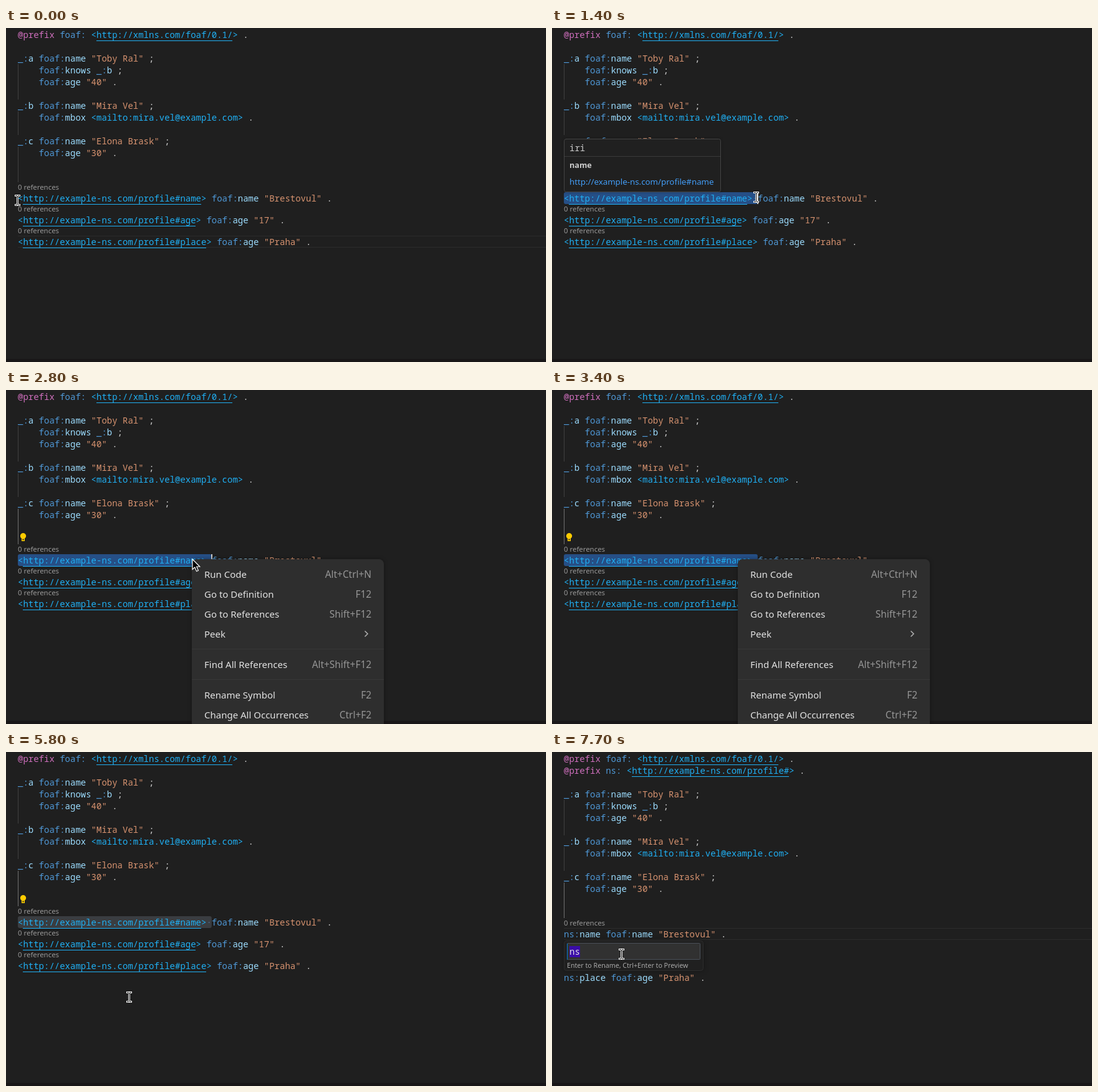
Recreate the animation shown at these times as an HTML page with a canvas. Size 866x537 px, loop 8 s.

```html
<!DOCTYPE html>
<html lang="en">
<head>
<meta charset="utf-8">
<title>Editor: extract prefix</title>
<style>
  html, body { margin: 0; width: 100%; height: 100%; overflow: hidden; background: #1f1f1f; }
  canvas { display: block; }
</style>
</head>
<body>
<canvas id="stage" width="866" height="537"></canvas>
<script>
const ctx = document.getElementById('stage').getContext('2d');
const LOOP = 8000, LEFT = 19, CHAR = 8.4, LINE = 19, LENS = 16;
const MONO = '14px "Noto Sans Mono", monospace';
const sans = (size, weight = 400) => `${weight} ${size}px "Noto Sans", sans-serif`;
const C = {
  bg: '#1f1f1f', keyword: '#cf6fbd', prefix: '#4f98d6', local: '#9cdcfe', iri: '#20b0f4',
  string: '#d6926f', plain: '#d0d0d0', fresh: '#3dd0b0', lens: '#999999',
  select: '#264f86', idle: '#3a3d41', match: '#343a41'
};

const BODY = [
  '', '_:a foaf:name "Toby Ral" ;', '    foaf:knows _:b ;', '    foaf:age "40" .',
  '', '_:b foaf:name "Mira Vel" ;', '    foaf:mbox <mailto:mira.vel@example.com> .',
  '', '_:c foaf:name "Elona Brask" ;', '    foaf:age "30" .', '', ''
];
const HEAD = '@prefix foaf: <http://xmlns.com/foaf/0.1/> .';
const NS = 'http://example-ns.com/profile#';
const ITEMS = [['name', 'foaf:name "Brestovul" .'], ['age', 'foaf:age "17" .'], ['place', 'foaf:age "Praha" .']];

const colX = col => LEFT + col * CHAR;
const at = (t, from, to) => t >= from && t < to;

function rect(x, y, w, h, color) {
  ctx.fillStyle = color;
  ctx.fillRect(x, y, w, h);
}

function text(str, x, y, font, color, align = 'left') {
  ctx.font = font;
  ctx.fillStyle = color;
  ctx.textAlign = align;
  ctx.fillText(str, x, y);
}

function panel(x, y, w, h, r, fill, stroke, blur = 0) {
  ctx.save();
  ctx.shadowColor = 'rgba(0,0,0,.36)';
  ctx.shadowBlur = blur;
  ctx.beginPath();
  ctx.roundRect(x, y, w, h, r);
  ctx.fillStyle = fill;
  ctx.fill();
  ctx.shadowBlur = 0;
  if (stroke) {
    ctx.strokeStyle = stroke;
    ctx.lineWidth = 1;
    ctx.stroke();
  }
  ctx.restore();
}

function underline(from, to, top) {
  rect(Math.round(colX(from)), top + 19, Math.round((to - from) * CHAR), 1, C.iri);
}

// Splits a line into coloured tokens; style overrides the default colours.
function code(line, top, style = {}) {
  const color = { ...C, ...style };
  const put = (str, col, c) => text(str, colX(col), top + 15, MONO, c);
  for (const m of line.matchAll(/@prefix|<[^>]*>|"[^"]*"|(\w+:)(\w*)|[.;]/g)) {
    const [tok, pre, local] = m, col = m.index;
    if (tok[0] === '@') put(tok, col, color.keyword);
    else if (tok[0] === '<') {
      put(tok, col, color.iri);
      if (tok[1] === 'h' && !style.noLink) underline(col + 1, col + tok.length - 1, top);
    } else if (tok[0] === '"') put(tok, col, color.string);
    else if (pre) {
      put(pre, col, color.prefix);
      put(local, col + pre.length, color.local);
    } else put(tok, col, color.plain);
  }
}

function lineBox(top) {
  rect(LEFT, top, 847, 1, '#2c2c2c');
  rect(LEFT, top + 18, 847, 1, '#2c2c2c');
}

const selectedCols = t => {
  if (t < 600) return 0;
  const steps = [8, 16, 25, 31, 34, 36];
  return steps[(t - 600) / 100] ?? 37;
};

function caretOn(t) {
  if (t < 400) return false;
  if (t < 1900) return true;
  if (t < 2400) return false;
  if (t < 3200) return true;
  if (t < 3700) return false;
  if (t < 4200) return true;
  return at(t, 4600, 4700) || at(t, 6700, 7000);
}

function selection(t, top, renamed) {
  if (t >= 7000) return;
  const n = renamed ? 8 : selectedCols(t);
  const bar = (y, color, col = 0) => {
    ctx.beginPath();
    ctx.roundRect(colX(col), y, n * CHAR, LINE, 3);
    ctx.fillStyle = color;
    ctx.fill();
  };
  if (n) bar(top, at(t, 4700, 6700) ? C.idle : C.select);
  if (n && n <= 31 && !renamed) {
    bar(top + 35, C.match);
    bar(top + 70, C.match);
    if (n <= 8) bar(1, C.match, 14);
  }
  if (renamed || n === 37) text('·', colX(n - 1), top + 15, MONO, '#4f6c8c');
}

function bulb() {
  ctx.fillStyle = '#ffcc00';
  ctx.beginPath();
  ctx.arc(27.5, 234.7, 4.7, 0, 7);
  ctx.fill();
  rect(25, 238, 5, 5, '#ffcc00');
  rect(26.5, 239.5, 2, 2, C.bg);
}

function editor(t) {
  const renamed = t >= 6700, shift = renamed ? LINE : 0, linked = t < 7700;
  const nameTop = 264 + shift;
  rect(0, 0, 866, 537, C.bg);
  rect(0, 532, 866, 5, '#191718');

  if (t < 400) lineBox(334);
  else if (t < 600 || t >= 7000) lineBox(nameTop);
  if (at(t, 100, 400)) rect(LEFT, 264, 37 * CHAR, LINE, '#213248');
  selection(t, nameTop, renamed);

  for (const [from, to, active] of [[58, 115], [134, 172], [191, 248, t >= 400]])
    rect(LEFT, from + shift, 1, to - from, active ? '#707070' : '#404040');

  code(HEAD, 1);
  if (renamed) {
    const raw = t < 6800 ? { keyword: C.plain, iri: C.fresh } : {};
    code(`@prefix ns: <${NS}> .`, 20, { ...raw, noLink: linked });
  }
  BODY.forEach((line, i) => code(line, 20 + shift + i * LINE));

  ITEMS.forEach(([id, rest], i) => {
    const top = nameTop + i * (LINE + LENS);
    text('0 references', LEFT, top - 4, sans(11.4), C.lens);
    if (!renamed) return code(`<${NS}${id}> ${rest}`, top);
    const subject = `ns:${id}`, pad = ' '.repeat(subject.length + 1);
    code(subject, top, t < 6800 ? { prefix: C.iri, local: C.iri } : {});
    code(pad + rest, top);
    if (linked) underline(0, subject.length, top);
  });

  if (at(t, 2700, 7300)) bulb();
  if (caretOn(t)) {
    const col = renamed ? 8 : selectedCols(t);
    rect(Math.round(colX(col)) - 1, nameTop, 2, LINE, '#c8c8c8');
  }
}

function hoverCard(alpha) {
  ctx.globalAlpha = alpha;
  panel(19.5, 178.5, 251, 85, 3, '#202020', '#454545', 4);
  rect(20, 206, 250, 1, '#3a3a3a');
  text('iri', 28, 198, MONO, '#cccccc');
  text('name', 28, 225, sans(12.6, 700), '#cccccc');
  text(NS + 'name', 28, 252, sans(13.3), '#429cf5');
  ctx.globalAlpha = 1;
}

const MENU = [
  [296, 'Run Code', 'Alt+Ctrl+N'], [328, 'Go to Definition', 'F12'],
  [360, 'Go to References', 'Shift+F12'], [392, 'Peek', ''],
  [441, 'Find All References', 'Alt+Shift+F12'],
  [490, 'Rename Symbol', 'F2'], [522, 'Change All Occurrences', 'Ctrl+F2']
];

function menu(t) {
  ctx.globalAlpha = t < 2800 ? 0.6 : 1;
  panel(298, 272, 308, 300, 8, '#2e2e2e', null, 6);
  for (const y of [416, 465]) rect(298, y, 308, 1, '#383838');
  const active = t === 3200 ? 392 : t === 3300 ? 490 : 0;
  for (const [y, label, keys] of MENU) {
    if (y === active) rect(298, y - 16, 308, 32, '#434343');
    text(label, 318, y + 6, sans(15), '#e2e2e2');
    text(keys, 586, y + 6, sans(15.4), '#969696', 'right');
  }
  ctx.strokeStyle = '#b0b0b0';
  ctx.lineWidth = 1.5;
  ctx.beginPath();
  ctx.moveTo(576, 388);
  ctx.lineTo(580, 392);
  ctx.lineTo(576, 396);
  ctx.stroke();
  ctx.globalAlpha = 1;
}

function renameBox() {
  panel(19.5, 303.5, 223, 48, 4, '#202020', '#2d2d2d', 8);
  panel(24.5, 307.5, 213, 26, 1, '#313131', '#4a5058');
  rect(24, 308, 1, 26, '#0078d4');
  rect(28, 312, 17, 18, '#3a0ca8');
  text('ns', 28, 326, MONO, '#e4e4e4');
  text('Enter to Rename, Ctrl+Enter to Preview', 24, 347, sans(10.65), '#a8a8a8');
}

// Pointer path: time, x, y. Values between points are interpolated.
const PATH = [
  [0, 18, 277], [500, 18, 277], [600, 92, 273], [700, 167, 271], [800, 235, 271], [900, 285, 271],
  [1100, 320, 272], [1300, 327, 272], [1600, 327, 272], [1700, 328, 272], [2000, 328, 272],
  [2400, 299, 275], [2600, 299, 275], [2700, 299, 272], [3100, 299, 272], [3200, 345, 388],
  [3300, 390, 494], [3400, 400, 570], [5500, 270, 570], [5600, 254, 434], [6100, 111, 333],
  [6600, 111, 333], [6700, 111, 325], [8000, 111, 325]
];

function pointer(t) {
  const i = PATH.findIndex(p => p[0] > t);
  const [t0, x0, y0] = PATH[i - 1], [t1, x1, y1] = PATH[i];
  const k = (t - t0) / (t1 - t0);
  return [x0 + (x1 - x0) * k, y0 + (y1 - y0) * k];
}

function beam(x, y) {
  ctx.beginPath();
  for (const s of [-1, 1]) {
    ctx.moveTo(x - 3, y + 7.5 * s);
    ctx.lineTo(x - 1, y + 7.5 * s);
    ctx.lineTo(x, y + 6.5 * s);
    ctx.lineTo(x + 1, y + 7.5 * s);
    ctx.lineTo(x + 3, y + 7.5 * s);
  }
  ctx.moveTo(x, y - 6.5);
  ctx.lineTo(x, y + 6.5);
  ctx.lineCap = 'square';
  ctx.strokeStyle = '#fff';
  ctx.lineWidth = 3;
  ctx.stroke();
  ctx.strokeStyle = '#000';
  ctx.lineWidth = 1;
  ctx.stroke();
}

function arrow(x, y) {
  ctx.beginPath();
  for (const [dx, dy] of [[0, 0], [0, 16.5], [3.8, 13], [6.6, 19.5], [9.4, 18.2], [6.7, 12], [11.8, 12]])
    ctx.lineTo(x + dx, y + dy);
  ctx.closePath();
  ctx.fillStyle = '#000';
  ctx.fill();
  ctx.strokeStyle = '#fff';
  ctx.lineWidth = 1.2;
  ctx.stroke();
}

function draw(t) {
  editor(t);
  if (at(t, 100, 400)) hoverCard(t < 200 ? 0.5 : 1);
  if (at(t, 1300, 2700)) hoverCard(t < 1400 ? 0.5 : 1);
  const menuOpen = at(t, 2700, 4600);
  if (menuOpen) menu(t);
  if (t >= 7700) renameBox();
  if (at(t, 3400, 5600)) return;
  const [x, y] = pointer(t);
  if (menuOpen) arrow(x, y);
  else beam(Math.round(x) + 0.5, Math.round(y));
}

const start = performance.now();
function tick() {
  const t = (performance.now() - start) % LOOP;
  draw(Math.floor(t / 100) * 100);
  requestAnimationFrame(tick);
}
tick();
</script>
</body>
</html>
```
